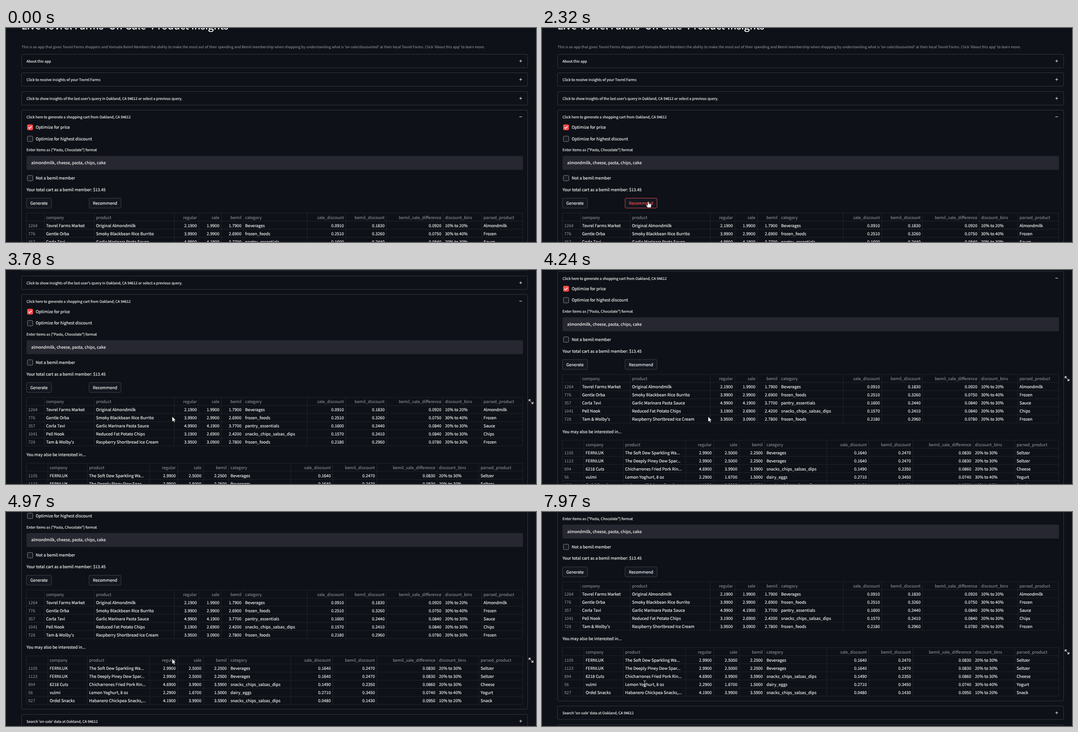
An HTML page for the animation above (8000 ms loop, 1177 by 476 pixels).

```html
<!DOCTYPE html>
<html lang="en">
<head>
<meta charset="utf-8">
<style>
  html, body { margin: 0; width: 100%; height: 100%; overflow: hidden; background: #0e1117; }
  svg { display: block; width: 1177px; height: 476px; }
  text {
    font: 9.17px "Noto Sans CJK JP", "Noto Sans CJK SC", sans-serif;
    fill: #fafafa; stroke: #fafafa; stroke-width: .18; text-rendering: geometricPrecision;
  }
  text.small { font-size: 8.02px; }
  text.caption { font-size: 8.05px; }
  text.title { font-size: 22.6px; stroke-width: .4; }
  text.dim { fill: #a0a2a6; stroke: none; }
  .box { fill: none; stroke: #35383f; }
  .grid { fill: none; stroke: #22252c; }
  .input { fill: #262730; }
  .button { fill: #131720; stroke: #3e4047; }
  .hover .button { stroke: #dc4446; }
  .hover text { fill: #ff4b4b; stroke: #ff4b4b; }
  .check { fill: #191c23; stroke: #85878c; }
  .checked { fill: #ff4b4b; }
  .icon { fill: none; stroke: #fafafa; }
</style>
</head>
<body>
<svg viewBox="0 0 1177 476">
  <g id="page"></g>
  <g id="cursor">
    <path id="arrow" d="M0 0V11.4L2.6 9 4.3 12.8 6.2 12 4.6 8.3H8Z" fill="#fff" stroke="#000" stroke-width=".5"/>
    <path id="hand" d="M-1.2 1Q0-.6 1.2 1V5L6 6Q7 6.4 7 8L6 13.5H-1.5L-5 8.5Q-4.6 6.8-2.8 8L-1.2 9Z" fill="#fff" stroke="#000" stroke-width=".6"/>
    <path id="beam" d="M-2.5-6.5H-.8L0-6 .8-6.5H2.5M0-6V6M-2.5 6.5H-.8L0 6 .8 6.5H2.5" fill="none" stroke="#d8d8d8"/>
  </g>
</svg>
<script>
const $ = id => document.getElementById(id);

// Page content, in page coordinates. Text y is the vertical middle.
const text = (x, y, s, cls = '', anchor = 'start') =>
  `<text x="${x}" y="${y + 3.2}" class="${cls}" text-anchor="${anchor}">${s.replace(/&/g, '&amp;')}</text>`;
const rect = (x, y, w, h, cls, r = 2.5) =>
  `<rect x="${x}" y="${y}" width="${w}" height="${h}" rx="${r}" class="${cls}"/>`;

const card = (y, label, h = 30, open = false) =>
  rect(34.5, y, 1124, h, 'box') + text(45.5, y + 15.2, label, 'small') +
  `<path class="icon" d="M1140 ${y + 15}h6${open ? '' : 'm-3-3v6'}"/>`;

const checkbox = (y, label, on) =>
  (on ? rect(47, y - 6.5, 12.8, 12.8, 'checked') +
        `<path class="icon" stroke-width="1.6" d="M49.8 ${y}l2.5 2.6 4.5-5"/>`
      : rect(47.5, y - 6, 12, 12, 'check', 2)) + text(66, y, label);

const button = (id, x, w, label) =>
  `<g id="${id}">${rect(x, 378.5, w, 22, 'button')}${text(x + w / 2, 390, label, '', 'middle')}</g>`;

const heads = ['', 'company', 'product', 'regular', 'sale', 'bemil', 'category', 'sale_discount',
  'bemil_discount', 'bemil_sale_difference', 'discount_bins', 'parsed_product'];

// Members get 10% off the sale price; discounts are relative to the regular price.
function cellsOf(row) {
  const [id, company, product, regular, sale, category, parsed] = row.split('|');
  const member = (sale * .9).toFixed(2);
  const off = price => (1 - price / regular).toFixed(3);
  const tens = Math.floor(off(member) * 10) * 10;
  const num = v => (+v).toFixed(4);
  return [id, company, product, num(regular), num(sale), num(member), category, num(off(sale)),
    num(off(member)), num(off(member) - off(sale)), `${tens}% to ${tens + 10}%`, parsed];
}

function table(id, top, edges, rows) {
  const pitch = 18, height = pitch * (rows.length + 1);
  let lines = edges.map(x => `M${x} ${top}v${height}`).join('');
  let out = '';
  [heads, ...rows.map(cellsOf)].forEach((cells, r, all) => {
    const y = top + r * pitch;
    lines += `M45.5 ${y}h1102`;
    cells.forEach((s, c) => {
      const right = !isNaN(all[1][c]) && c > 0;
      out += text(right ? edges[c + 1] - 4.2 : edges[c] + 4, y + 9.8, s,
        r && c ? '' : 'dim', right ? 'end' : 'start');
    });
  });
  return `<path class="grid" d="${lines}M45.5 ${top + height}h1102"/>${out}
    <path id="${id}" class="icon" stroke-width="1.1" d="M1161.5 ${top + 9}v-4h4m-4 0l4 4m1 1l4 4m-4 0h4v-4"/>`;
}

const cards = ['About this app', 'Click to receive insights of your Tovrel Farms',
  "Click to show insights of the last user's query in Oakland, CA 94612 or select a previous query."];

$('page').innerHTML =
  text(34.5, .2, "Live Tovrel Farms 'On-Sale' Product Insights", 'title') +
  text(34.5, 41.3, "This is an app that gives Tovrel Farms shoppers and Vomada Bemil Members the ability to make the most out of their spending and Bemil membership when shopping by understanding what is 'on-sale/discounted' at their local Tovrel Farms. Click 'About this app' to learn more.", 'caption dim') +
  cards.map((label, i) => card(58.5 + Math.round(41.3 * i), label)).join('') +
  card(182.5, 'Click here to generate a shopping cart from Oakland, CA 94612', 494, true) +
  checkbox(221, 'Optimize for price', true) +
  checkbox(246.5, 'Optimize for highest discount') +
  text(45.5, 271.2, 'Enter items as ("Pasta, Chocolate") format', 'small') +
  rect(45.5, 284.5, 1102.5, 31, 'input') +
  text(56, 300, 'almondmilk, cheese, pasta, chips, cake') +
  checkbox(334, 'Not a bemil member') +
  text(45.5, 359.7, 'Your total cart as a bemil member: $13.45') +
  button('generate', 45.5, 55.5, 'Generate') +
  button('recommend', 184.5, 71, 'Recommend') +
  table('expand1', 411.5, [45.5, 85, 196, 373.5, 428, 478, 527, 668.5, 754.5, 845, 971, 1056.5, 1147.5], [
    '1264|Tovrel Farms Market|Original Almondmilk|2.19|1.99|Beverages|Almondmilk',
    '776|Gentle Orba|Smoky Blackbean Rice Burrito|3.99|2.99|frozen_foods|Frozen',
    '357|Corla Tavi|Garlic Marinara Pasta Sauce|4.99|4.19|pantry_essentials|Sauce',
    '1041|Pell Nook|Reduced Fat Potato Chips|3.19|2.69|snacks_chips_salsas_dips|Chips',
    "728|Tam & Wolby's|Raspberry Shortbread Ice Cream|3.95|3.09|frozen_foods|Frozen"]) +
  text(45.5, 538.7, 'You may also be interested in...') +
  table('expand2', 558, [45.5, 93, 180.5, 319, 381, 438, 494.5, 632.5, 725.5, 823.5, 957.5, 1050, 1147.5], [
    '1105|FERNLUK|The Soft Dew Sparkling Wa...|2.99|2.50|Beverages|Seltzer',
    '1123|FERNLUK|The Deeply Piney Dew Spar...|2.99|2.50|Beverages|Seltzer',
    '894|6218 Cuts|Chicharrones Fried Pork Rin...|4.69|3.99|snacks_chips_salsas_dips|Cheese',
    '56|vulmi|Lemon Yoghurt, 8 oz|2.29|1.67|dairy_eggs|Yogurt',
    '927|Ordel Snacks|Habanero Chickpea Snacks,...|4.19|3.99|snacks_chips_salsas_dips|Snack']) +
  card(688, "Search 'on-sale' data at Oakland, CA 94612") +
  card(729.5, '');

// Time runs in ticks, 15 per second. Each wheel click scrolls one eased step.
const clicks = [48.2, 52.4, 60.8, 72.1];
const ease = p => p * p * (3 - 2 * p);
const clamp = p => Math.min(1, Math.max(0, p));
const scrollAt = tick =>
  clicks.reduce((sum, start) => sum + 64.1 * ease(clamp((tick - start) / 4.5)), 0);

// Cursor stops: [tick, x, y].
const stops = [[6, 450, 495], [19, 246, 361], [27, 237, 394], [34, 235, 385], [39, 240, 389],
  [47, 367, 333], [57, 369, 326], [85, 369, 327], [86, 393, 325], [90, 231, 359], [92, 139, 360],
  [95, 139, 360], [98, 358, 339], [102, 228, 380], [118, 228, 380], [120, 228, 382]];

function cursorAt(tick) {
  const next = Math.max(1, stops.findIndex(s => s[0] >= tick));
  const [t0, x0, y0] = stops[next - 1], [t1, x1, y1] = stops[next];
  const p = clamp((tick - t0) / (t1 - t0));
  return [x0 + (x1 - x0) * p, y0 + (y1 - y0) * p];
}

const show = (id, on) => { $(id).style.display = on ? '' : 'none'; };

function draw(now) {
  const tick = Math.floor((now % 8000 + 33) * .015);
  const scroll = scrollAt(tick);
  const [x, y] = cursorAt(tick);
  const over = (left, right, top, bottom) =>
    y < 476 && x > left && x < right && y + scroll > top && y + scroll < bottom;
  const onButton = over(184, 256, 378, 401);
  const onText = tick > 86 && x < 320;

  $('page').setAttribute('transform', `translate(0 ${-scroll})`);
  $('cursor').setAttribute('transform', `translate(${x} ${y})`);
  $('recommend').classList.toggle('hover', onButton);
  show('expand1', over(45, 1148, 411, 521));
  show('expand2', over(45, 1148, 558, 667));
  show('hand', onButton);
  show('beam', onText);
  show('arrow', !onButton && !onText);
  requestAnimationFrame(draw);
}
requestAnimationFrame(draw);
</script>
</body>
</html>
```
